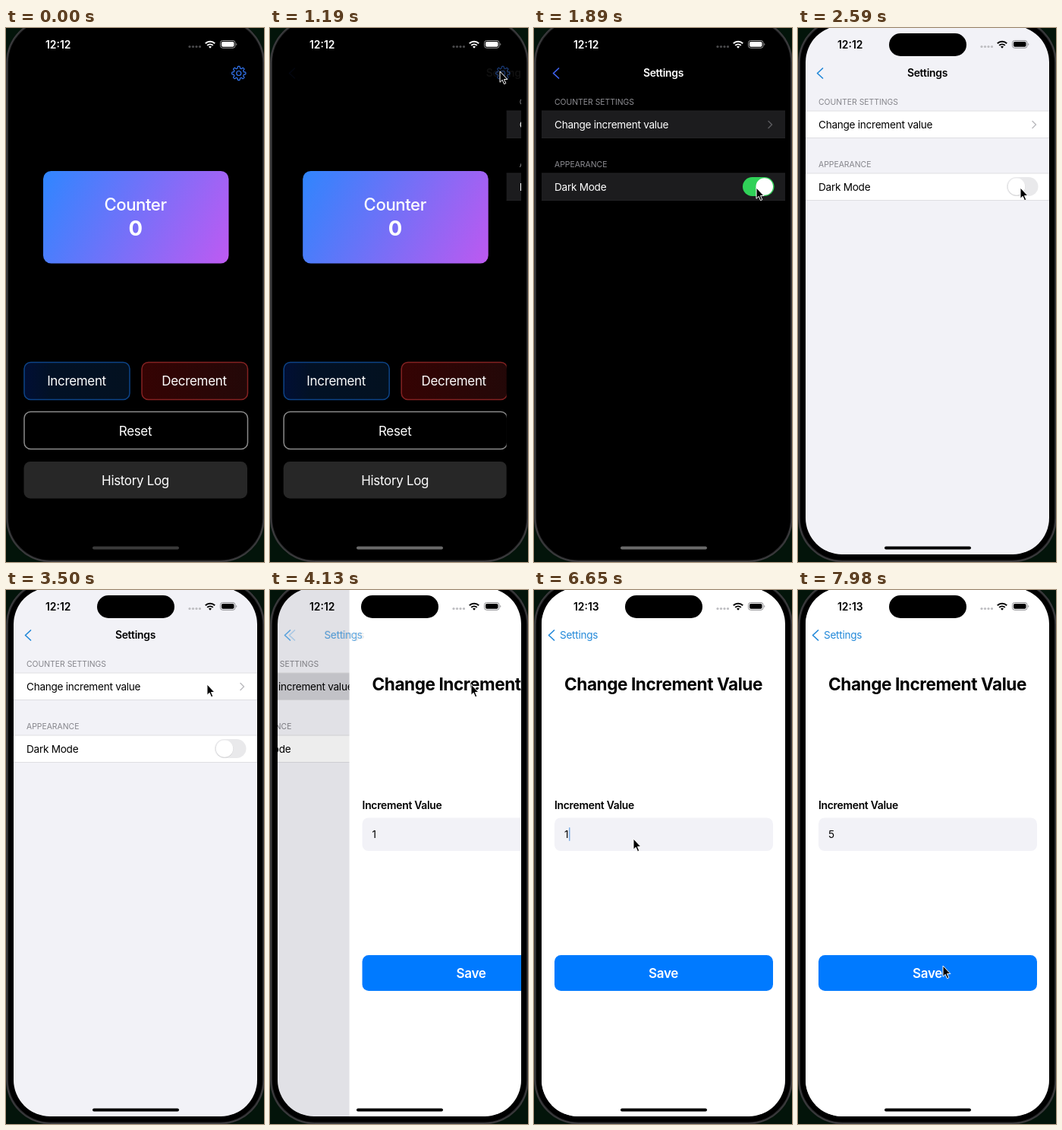
Recreate the animation shown at these times as an HTML page. Size 340 px wide and 702 px high, loop 8 s.

```html
<!DOCTYPE html>
<html lang="en">
<head>
<meta charset="utf-8">
<title>Counter app</title>
<style>
html, body { margin: 0; width: 100%; height: 100%; overflow: hidden; background: #03100a; }
svg {
  display: block; width: 340px; height: 702px;
  --ink: #fff; --page: #000; --row: #1c1c1e; --line: #232325; --head: #8e8e93;
  --tint: #3f63f2; --bar: #6a6a6a; --chev: #5a5a5e; --dot: #4a4a4c; --track: #30d158; --batt: #9a9a9a;
}
svg.light {
  --ink: #000; --page: #f2f2f7; --row: #fff; --line: #dedee2; --head: #85858b;
  --tint: #2389d9; --bar: #000; --chev: #bcbcc0; --dot: #bdbdc1; --track: #e9e9eb; --batt: #8d8d90;
}
text { font-family: Inter, "Liberation Sans", sans-serif; font-size: 13.6px; letter-spacing: -.02em; fill: var(--ink); }
.mid { text-anchor: middle; }
.semi { font-weight: 600; font-size: 13.9px; }
.head { font-size: 10.4px; letter-spacing: 0; fill: var(--head); }
.btn { font-size: 17px; fill: #fff; }
.row { fill: var(--row); }
.chev { fill: none; stroke: var(--tint); stroke-width: 1.7; stroke-linecap: round; stroke-linejoin: round; }
</style>
</head>
<body>
<svg id="stage" viewBox="0 0 340 702">
  <defs>
    <clipPath id="screen"><rect x="10" y="-3" width="321" height="695" rx="48"/></clipPath>
    <linearGradient id="card" gradientUnits="userSpaceOnUse" x1="49" y1="188" x2="293" y2="309">
      <stop offset="0" stop-color="#2f86ff"/><stop offset="1" stop-color="#be5af2"/>
    </linearGradient>
    <linearGradient id="blue"><stop offset="0" stop-color="#010f35"/><stop offset=".25" stop-color="#021125"/><stop offset="1" stop-color="#031120"/></linearGradient>
    <linearGradient id="red"><stop offset="0" stop-color="#350303"/><stop offset="1" stop-color="#230808"/></linearGradient>
  </defs>
  <rect width="340" height="702" fill="#03140a"/>
  <rect x="1.500" y="-11.500" width="338" height="712.500" rx="57" fill="#000" stroke="#2b2b2d" stroke-width="3"/>
  <rect x="1" y="-12" width="339" height="713.500" rx="57.500" fill="none" stroke="#4c4c4f" stroke-width=".8"/>

  <g clip-path="url(#screen)">
    <rect width="340" height="702" fill="#000"/>
    <g id="home">
      <rect x="49" y="188" width="244.500" height="121.500" rx="10.500" fill="url(#card)"/>
      <text class="mid" x="170.500" y="239.500" style="font-size:22.2px;font-weight:500;fill:#fff">Counter</text>
      <text class="mid" x="170.500" y="272.500" style="font-size:27.5px;font-weight:700;fill:#fff">0</text>
      <g stroke-width="1.500">
        <rect x="24" y="439.500" width="139" height="49" rx="8.500" fill="url(#blue)" stroke="#0d4488"/>
        <rect x="179" y="439.500" width="139.500" height="49" rx="8.500" fill="url(#red)" stroke="#852222"/>
        <rect x="24" y="504.500" width="294.500" height="49" rx="8.500" fill="#000" stroke="#8b8b8b"/>
      </g>
      <rect x="23.500" y="570" width="294.500" height="48.500" rx="8.500" fill="#272727"/>
      <g class="mid">
        <text class="btn" x="93" y="470">Increment</text>
        <text class="btn" x="248" y="470">Decrement</text>
        <text class="btn" x="170.500" y="535.500">Reset</text>
        <text class="btn" x="170.500" y="601">History Log</text>
      </g>
    </g>
    <rect id="dim1" x="10" width="321" height="702" opacity="0"/>

    <g id="settings">
      <rect x="10" width="321" height="702" fill="var(--page)"/>
      <text class="head" x="27" y="101">COUNTER SETTINGS</text>
      <rect id="row1" class="row" x="10" y="109" width="321" height="35.500"/>
      <text x="27" y="132">Change increment value</text>
      <path class="chev" d="M309 122.500l4.500 4.500l-4.500 4.500" style="stroke:var(--chev);stroke-width:1.500"/>
      <text class="head" x="27" y="183">APPEARANCE</text>
      <rect class="row" x="10" y="191" width="321" height="35.500"/>
      <path d="M10 109H331M10 144.500H331M10 191H331M10 226.500H331" stroke="var(--line)"/>
      <text x="27" y="213.500">Dark Mode</text>
      <rect x="275" y="196" width="41.500" height="25" rx="12.500" fill="var(--track)"/>
      <circle cy="209" r="11.500" fill="#000" opacity=".12" class="knob"/>
      <circle cy="208.500" r="11.300" fill="#fff" class="knob"/>
    </g>
    <rect id="dim2" x="10" width="321" height="702" opacity="0"/>

    <g id="edit">
      <rect x="10" width="321" height="702" fill="#fff"/>
      <text class="mid" x="170.500" y="132" style="font-size:22.6px;font-weight:700">Change Increment Value</text>
      <text class="semi" x="27" y="287.500">Increment Value</text>
      <rect x="27" y="299.500" width="288" height="43.500" rx="8" fill="#f2f2f7"/>
      <text id="hint" x="40" y="326" style="fill:#c3c3c8">Enter increment value</text>
      <text id="value" x="40" y="326"></text>
      <rect id="caret" y="312" width="1.500" height="18" rx=".7" fill="#2f7fd6"/>
      <rect x="27" y="480" width="288" height="47" rx="8.500" fill="#007aff"/>
      <text class="btn mid" x="170.500" y="510" style="font-weight:600">Save</text>
    </g>

    <g id="gear" fill="none" stroke="#3478f6" stroke-width="1.200" stroke-linejoin="round">
      <path id="teeth"/><circle cx="306.800" cy="59.500" r="3"/>
    </g>
    <text id="title" class="semi mid" x="170.500" y="64">Settings</text>
    <path id="backA" class="chev" d="M32.500 53l-7 6.500l7 6.500"/>
    <path id="backB" class="chev" d="M26.500 53l-7 6.500l7 6.500"/>
    <text id="backText" x="34" y="64" style="fill:var(--tint)">Settings</text>

    <rect x="120" y="7" width="102" height="30" rx="15" fill="#000"/>
    <text id="clock" class="semi" x="52" y="26.500" style="letter-spacing:0">12:12</text>
    <g fill="var(--dot)">
      <circle cx="242" cy="24.500" r="1.600"/><circle cx="246.500" cy="24.500" r="1.600"/>
      <circle cx="251" cy="24.500" r="1.600"/><circle cx="255.500" cy="24.500" r="1.600"/>
    </g>
    <path d="M262.800 20.200a9 9 0 0 1 12.400 0M265.200 22.900a5.500 5.500 0 0 1 7.600 0" fill="none" stroke="var(--ink)" stroke-width="2"/>
    <path d="M269 26.800l-2 -2.200a3 3 0 0 1 4 0z" fill="var(--ink)"/>
    <rect x="282.500" y="16.500" width="19.500" height="9.800" rx="3" fill="none" stroke="var(--batt)"/>
    <rect x="284" y="18" width="16.500" height="6.800" rx="1.800" fill="var(--ink)"/>
    <path d="M303.300 19.700a2 2 0 0 1 0 3.400z" fill="var(--batt)"/>
    <rect id="bar" x="114" y="681.500" width="114" height="4" rx="2" fill="var(--bar)"/>
  </g>
  <path id="cursor" d="M0 0v14.300l3.200 -3l2.300 5.400l2.300 -1l-2.300 -5.200h4.400z" fill="#000" stroke="#fff" stroke-width="1" stroke-linejoin="round"/>
</svg>
<script>
const $ = id => document.getElementById(id);
const stage = $('stage'), knobs = document.querySelectorAll('.knob');
const LOOP = 8000, STEP = 70, WIDTH = 321;

// time, x, y of the pointer tip
const path = [
  [0, 160, 720], [70, 170, 672], [280, 225, 470], [490, 280, 230], [700, 300, 90], [840, 303, 57],
  [1190, 303, 57], [1330, 300, 100], [1470, 296, 142], [1680, 294, 190], [1820, 293, 210],
  [2940, 293, 210], [3010, 283, 172], [3080, 266, 134], [3150, 277, 134], [3290, 277, 134],
  [3360, 255, 113], [3430, 244, 109], [3500, 265, 124], [4130, 265, 124],
  [4270, 226, 188], [4410, 184, 251], [4620, 147, 308], [4830, 132, 326], [4900, 131, 327],
  [7490, 131, 327], [7630, 145, 370], [7770, 170, 440], [7910, 189, 490], [7980, 191, 494]
];
// time, opacity, x
const caretSteps = [
  [0, 0, 46], [5530, 1, 46], [6650, .6, 46], [6720, 0, 46], [7000, .5, 46], [7070, 1, 46],
  [7140, 1, 39.5], [7280, 1, 47.5], [7560, .5, 47.5], [7630, 0, 47.5]
];

const latest = (table, t) => table.filter(r => r[0] <= t).pop();

function along(t) {
  const i = path.findIndex(p => p[0] > t);
  if (i < 0) return path[path.length - 1].slice(1);
  const a = path[i - 1], b = path[i], k = (t - a[0]) / (b[0] - a[0]);
  return [a[1] + (b[1] - a[1]) * k, a[2] + (b[2] - a[2]) * k];
}

// critically damped push
function push(t, start) {
  const s = Math.max(0, t - start) * .0158;
  return s > 9 ? 1 : 1 - (1 + s) * Math.exp(-s);
}

const shift = (id, x, y = 0) => $(id).setAttribute('transform', `translate(${x} ${y})`);
const fade = (id, o) => $(id).setAttribute('opacity', o);

function gearPath() {
  let d = '';
  for (let i = 0; i < 128; i++) {
    const a = i / 128 * 2 * Math.PI;
    const r = 7.9 + 1.2 * Math.max(-1, Math.min(1, 2.2 * Math.cos(8 * a)));
    d += (i ? 'L' : 'M') + (306.8 + r * Math.cos(a)).toFixed(2) + ' ' + (59.5 + r * Math.sin(a)).toFixed(2);
  }
  return d + 'z';
}

function draw(t) {
  const light = t >= 2590;
  const p = push(t, 1165), q = t < 4060 ? 0 : push(t, 3974);
  stage.classList.toggle('light', light);

  shift('home', -.3 * WIDTH * p);
  fade('dim1', .1 * p);
  shift('settings', WIDTH * (1 - p) - .3 * WIDTH * q);
  fade('dim2', .1 * q);
  shift('edit', WIDTH * (1 - q));

  fade('gear', Math.max(0, (t >= 910 ? .6 : 1) - 2 * p));
  shift('title', (1 - p) * 150 - 103 * q);
  fade('title', p * Math.max(0, 1 - 1.3 * q));
  fade('backA', p * (1 - q));
  fade('backB', q);
  shift('backText', 127 * (1 - q));
  fade('backText', q);
  $('row1').style.fill = t >= 4060 ? '#d1d1d6' : '';
  $('bar').style.fill = p ? '' : '#3a3a3a';
  knobs.forEach(k => k.setAttribute('cx', light ? 288 : 303.7));

  $('clock').textContent = t < 4620 ? '12:12' : '12:13';
  $('value').textContent = t < 7140 ? '1' : t < 7280 ? '' : '5';
  fade('hint', t >= 7140 && t < 7280 ? 1 : 0);
  const [, o, x] = latest(caretSteps, t);
  $('caret').setAttribute('x', x);
  fade('caret', o);
  shift('cursor', ...along(t));
}

$('teeth').setAttribute('d', gearPath());
const begin = performance.now();
function tick() {
  const t = (performance.now() - begin) % LOOP;
  draw(Math.floor(t / STEP) * STEP);
  requestAnimationFrame(tick);
}
tick();
</script>
</body>
</html>
```
